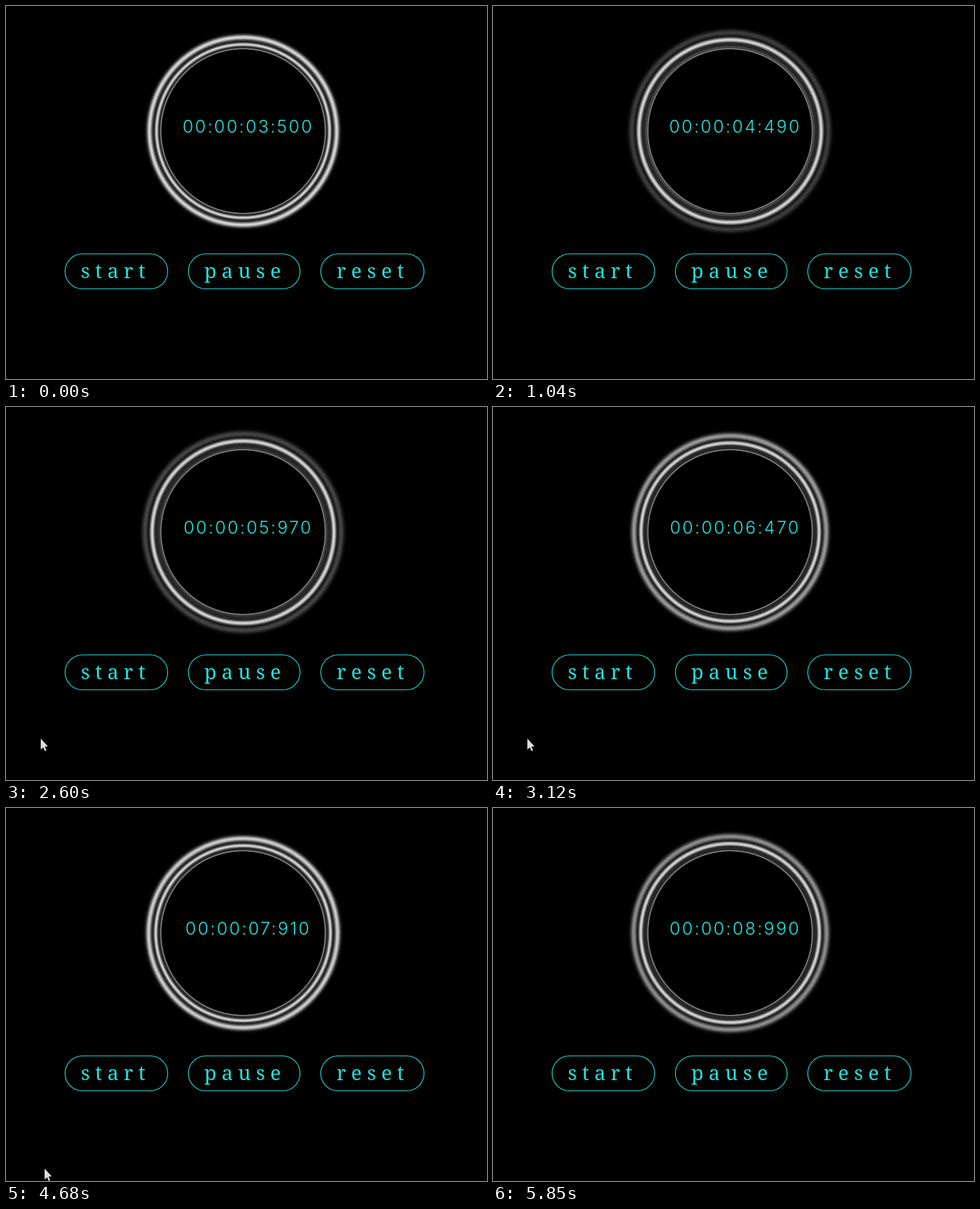
Animation of 745 by 577 pixels, one loop 5.98 s. Source, as an HTML page with a canvas:

```html
<!DOCTYPE html>
<html lang="en">
<head>
<meta charset="utf-8">
<title>Stopwatch</title>
<style>
  html, body { margin: 0; width: 100%; height: 100%; overflow: hidden; background: #000; }
  canvas { display: block; }
</style>
</head>
<body>
<canvas id="stage" width="745" height="577"></canvas>
<script>
const ctx = document.getElementById('stage').getContext('2d');
const LOOP = 5980, STEP = 130, PULSE = 4160 / 3, CYAN = '#1fe3dd';
const CENTER = { x: 367.2, y: 193.5 }, INNER = 126, OUTER = 162;

// Key points [time, ...values]: the stopwatch runs unevenly, the pointer drifts in and out
const counterKeys = [[0, 3500], [1040, 4490], [1950, 5340], [3120, 6470], [4160, 7400], [5200, 8410], [5850, 8990]];
const pointerKeys = [[1950, 44, 545], [2470, 54, 513], [4160, 52, 513], [4290, 47, 545], [4810, 64, 562]];

function sample(keys, at) {
  const next = Math.max(1, keys.findIndex(key => key[0] >= at));
  const [a, b] = [keys[next - 1], keys[next]];
  const k = (at - a[0]) / (b[0] - a[0]);
  return a.slice(1).map((v, i) => v + (b[i + 1] - v) * k);
}

function smooth(x) {
  const k = Math.min(1, Math.max(0, x));
  return k * k * (3 - 2 * k);
}

const bump = (x, width) => Math.exp(-((x / width) ** 2) / 2);

// Brightness of the ring: waves that swing in and out, fading at both ends
function glow(r, swing) {
  if (r <= INNER || r >= OUTER) return 0;
  let light = Math.max(38 * smooth((144 - r) / 4), 130 * bump(r - 127.4, 1));
  for (let wave = 1; wave <= 3; wave++) {
    const s = wave + swing;
    const level = 215 * smooth((s - 0.45) * 2) * smooth(3 - s);
    light = Math.max(light, level * bump(r - 123 - 11 * s, 1.1 + 0.9 * s));
  }
  return Math.round(light);
}

function drawRing(time) {
  const angle = time / PULSE * 2 * Math.PI;
  const swing = 0.35 * Math.sin(angle) + 0.13 * Math.sin(2 * angle);
  const fill = ctx.createRadialGradient(CENTER.x, CENTER.y, INNER, CENTER.x, CENTER.y, OUTER);
  for (let r = INNER; r <= OUTER; r += 0.5) {
    const light = glow(r, swing);
    fill.addColorStop((r - INNER) / (OUTER - INNER), `rgb(${light},${light},${light})`);
  }
  ctx.fillStyle = fill;
  ctx.beginPath();
  ctx.arc(CENTER.x, CENTER.y, OUTER, 0, 7);
  ctx.fill();
}

function label(text, x, y, font, spacing, align) {
  ctx.font = font;
  ctx.letterSpacing = spacing + 'px';
  ctx.textAlign = align;
  ctx.fillStyle = CYAN;
  ctx.fillText(text, x, y);
}

function drawCounter(time) {
  const ms = Math.round(sample(counterKeys, time)[0] / 10) * 10;
  const pad = (n, size) => String(n).padStart(size, '0');
  const text = `00:00:${pad(Math.floor(ms / 1000), 2)}:${pad(ms % 1000, 3)}`;
  label(text, 375, 196, '300 27px Inter, sans-serif', 2.6, 'center');
}

function drawButton(text, x, width) {
  ctx.strokeStyle = CYAN;
  ctx.lineWidth = 1.2;
  ctx.beginPath();
  ctx.roundRect(x + 0.5, 383.5, width - 1, 54, 27);
  ctx.stroke();
  label(text, x + 25, 421, '400 31px "Noto Serif", serif', 8, 'left');
}

function drawPointer(time) {
  if (time < 1950 || time > 4810) return;
  const [x, y] = sample(pointerKeys, time);
  ctx.save();
  ctx.translate(x, y);
  ctx.fillStyle = '#dedee2';
  ctx.fill(new Path2D('M0 0V17L3.8 13.6L6.4 19.2L8.7 18.2L6.3 12.6L11 12Z'));
  ctx.restore();
}

function render() {
  const time = Math.floor((performance.now() - start) % LOOP / STEP) * STEP;
  ctx.fillStyle = '#000';
  ctx.fillRect(0, 0, 745, 577);
  drawRing(time);
  drawCounter(time);
  drawButton('start', 91, 160);
  drawButton('pause', 282, 174);
  drawButton('reset', 487, 161);
  drawPointer(time);
  requestAnimationFrame(render);
}

const start = performance.now();
render();
</script>
</body>
</html>
```
